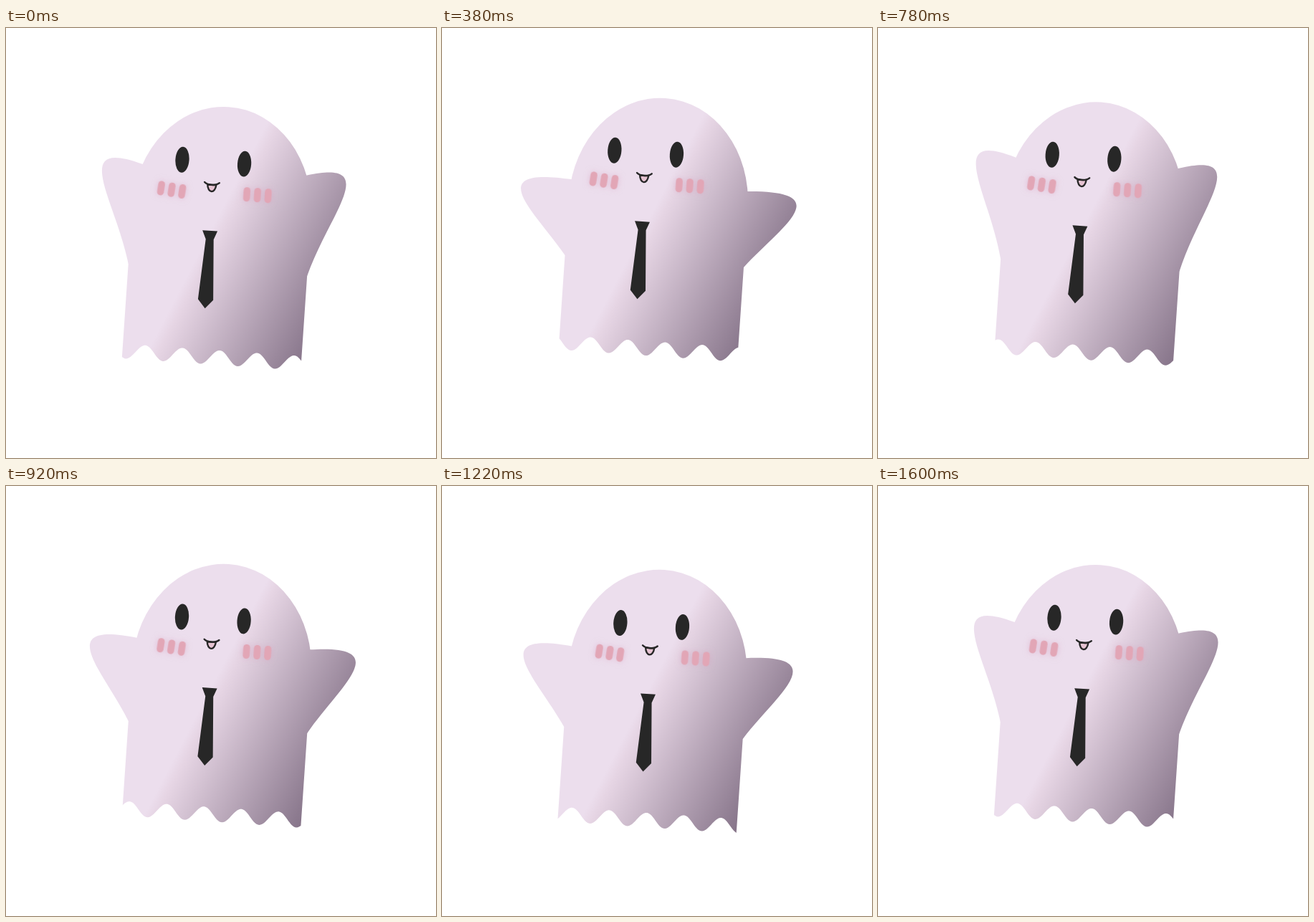
Recreate the animation shown at these times as an HTML page. Size 600x600 px, loop 1620 ms.

```html
<!DOCTYPE html>
<html lang="en">
<head>
<meta charset="utf-8">
<title>Waving ghost</title>
<style>
  html, body { margin: 0; width: 100%; height: 100%; overflow: hidden; background: #fff; }
  svg { display: block; width: 100%; height: 100%; }
  .ink { fill: #272727; }
  .line { fill: none; stroke: #272727; stroke-width: 2.4; stroke-linecap: round; stroke-linejoin: round; }
  .cheek { fill: #e2a6b6; filter: drop-shadow(0 0 4px rgba(214, 160, 190, .5)); }
</style>
</head>
<body>
<svg viewBox="0 0 600 600">
  <defs>
    <linearGradient id="skin" gradientUnits="userSpaceOnUse" x1="-14.9" y1="-12.9" x2="168.3" y2="67.5">
      <stop offset="0" stop-color="#ecdeed"/>
      <stop offset=".07" stop-color="#e6d5e4"/>
      <stop offset="1" stop-color="#87758a"/>
    </linearGradient>
    <g id="bars">
      <rect x="-19.6" y="-10" width="9.4" height="20" rx="4.6"/>
      <rect x="-4.7" y="-10" width="9.4" height="20" rx="4.6"/>
      <rect x="10.2" y="-10" width="9.4" height="20" rx="4.6"/>
    </g>
  </defs>
  <g id="ghost" fill="url(#skin)">
    <path id="armL"/>
    <path id="armR"/>
    <path id="body"/>
  </g>
  <g id="face">
    <g id="open" class="ink">
      <ellipse cx="-62" cy="-113.5" rx="9.6" ry="18"/>
      <ellipse cx="24.8" cy="-113.5" rx="9.6" ry="18"/>
    </g>
    <g id="shut" class="line">
      <path d="M-73.3-107Q-62.8-90-52.3-107"/>
      <path d="M14.2-107Q24.7-90 35.2-107"/>
    </g>
    <use href="#bars" class="cheek" transform="translate(-74 -70.6) rotate(5)"/>
    <use href="#bars" class="cheek" transform="translate(46 -71.3)"/>
    <path class="line" style="fill:#e6c3d2" d="M-24.5-81.7C-23.5-68.8-13.3-68.8-12.3-81.7Q-18.4-80.6-24.5-81.7Z"/>
    <path class="line" d="M-28.8-84.4Q-25.5-81.2-18.4-81.2T-8-84.6"/>
    <path class="ink" d="M-27.2-17.2H-6.2L-10.8-5.2L-5.6 79.2L-16.3 91.3L-26.9 79.2L-21.8-5.2Z"/>
  </g>
</svg>
<script>
const LOOP = 1620, CYCLE = 1600, STEP = 20, TILT = 3.9;
const HALF = 125, WAVE = 52.1;
const $ = id => document.getElementById(id);
const wave = (t, peak, period) => Math.cos(2 * Math.PI * (t - peak) / period);
const pt = (x, y) => x.toFixed(2) + ' ' + y.toFixed(2);

// Left arm: two handles and the upper joint, lowered and raised.
const DOWN = [[-176.8, -13.8], [-259.2, -66], [-123.8, -60.3]];
const UP = [[-142.3, -60.6], [-208.9, -149.2], [-113, -113.2]];

function arm(k, side) {
  const [a, b, c] = DOWN.map(([x, y], i) => [
    x + (UP[i][0] - x) * k,
    y + (UP[i][1] - y) * k
  ]);
  const p = ([x, y]) => pt(x * side, y);
  return `M${p([-HALF, 38])}C${p(a)} ${p(b)} ${p(c)}L${p([-85, c[1] + 12])}L${p([-85, 38])}Z`;
}

function body(shift) {
  let d = `M${-HALF} 160V-44A${HALF} 146 0 0 1 ${HALF} -44V160`;
  for (let x = HALF; x >= -HALF; x -= 2) {
    d += 'L' + pt(x, 160 + 10.2 * wave(x, shift - 67.6, WAVE));
  }
  return d + 'Z';
}

function draw(ms) {
  const t = Math.floor(ms % LOOP / STEP) * STEP % CYCLE;
  const bob = wave(t, 1275, CYCLE);
  const lift = (1 - wave(t, 280, CYCLE / 2)) / 2;

  $('ghost').setAttribute('transform',
    `translate(298 299.9) rotate(${TILT}) translate(0 ${10 * bob - 3.1})`);
  $('face').setAttribute('transform',
    `translate(${298.9 + 4.2 * bob} ${298.1 + 10.6 * bob}) rotate(${TILT})`);

  $('armL').setAttribute('d', arm(lift, 1));
  $('armR').setAttribute('d', arm(lift, -1));
  $('body').setAttribute('d', body(WAVE * t / CYCLE));

  const blink = t >= 160 && t < 340;
  $('open').style.display = blink ? 'none' : '';
  $('shut').style.display = blink ? '' : 'none';
}

const start = performance.now();
function tick() {
  draw(performance.now() - start);
  requestAnimationFrame(tick);
}
tick();
</script>
</body>
</html>
```
